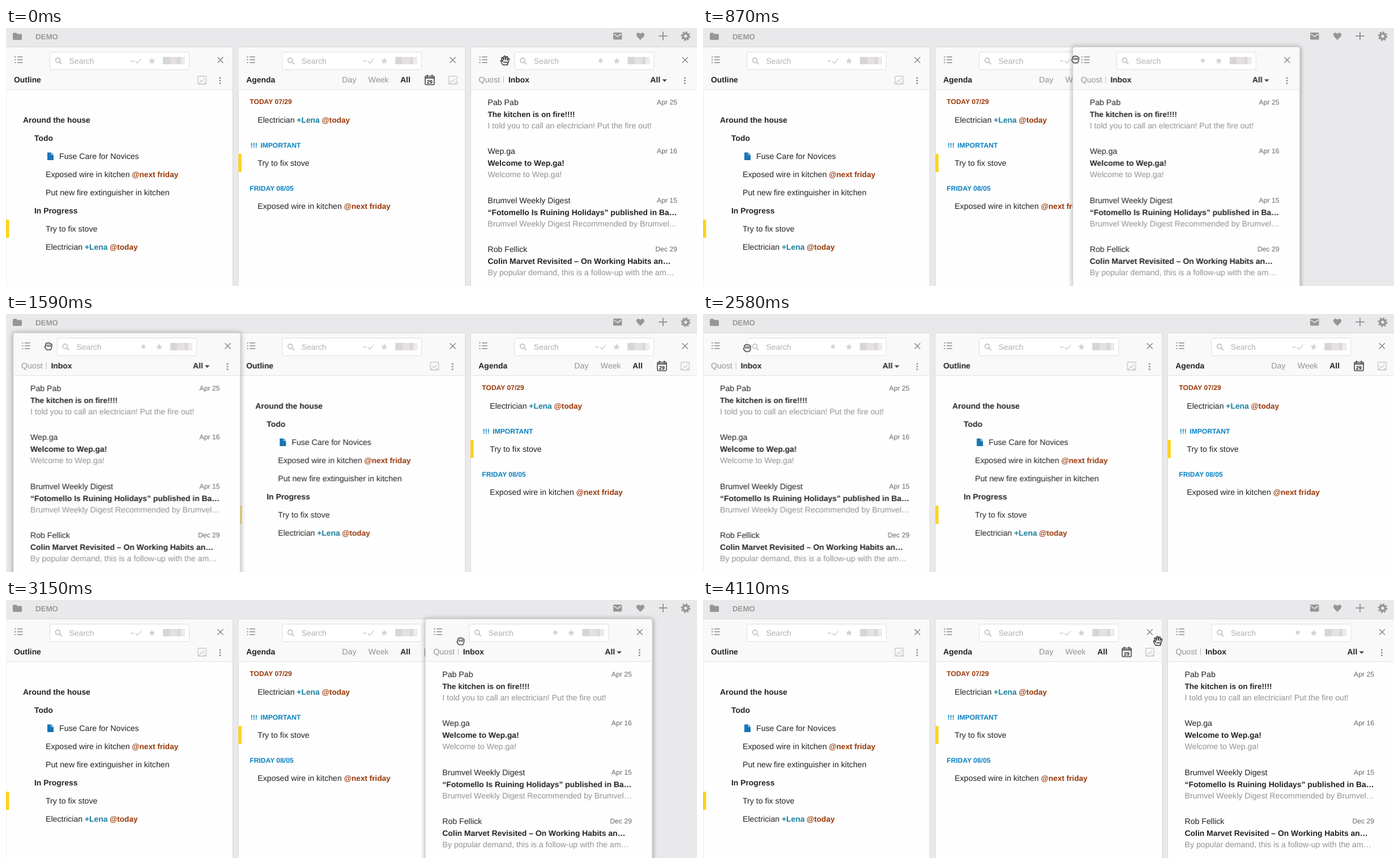
An HTML page that plays this animation: 1220 by 455 pixels, repeating every 4.2 s.

```html
<!DOCTYPE html>
<html lang="en">
<head>
<meta charset="utf-8">
<title>Panel dragging demo</title>
<style>
html, body { margin: 0; width: 100%; height: 100%; overflow: hidden; background: #e9e9eb; }
svg { display: block; width: 1220px; height: 455px; }
text { font: 14.15px "Liberation Sans", Arial, sans-serif; fill: #222; text-rendering: geometricPrecision; white-space: pre; }
.b { font-weight: bold; font-size: 13.9px; }
.tag { font-weight: bold; font-size: 13.6px; }
.g { fill: #929292; }
.small { font-size: 12.2px; fill: #666; text-anchor: end; }
.cap { font-weight: bold; font-size: 12.1px; }
.brown { fill: #983807; }
.blue { fill: #0881c1; }
.teal { fill: #1b7f9e; }
.line { fill: none; stroke: #888; stroke-width: 1.5; }
.pale { fill: none; stroke: #d4d4d4; stroke-width: 1.8; }

/* One loop is 4200 ms, so 1% is 42 ms. */
#outline, #agenda, #inbox, #shadow, #cx, #cy, #open, #fist { animation: 4.2s linear infinite; }
#outline { animation-name: outline; }
#agenda { animation-name: agenda; }
#inbox { animation-name: inbox; }
#shadow { animation-name: shadow; filter: blur(4px); }
#cx { animation-name: cx; }
#cy { animation-name: cy; }
#open { animation-name: open; animation-timing-function: step-end; }
#fist { animation-name: fist; animation-timing-function: step-end; }

@keyframes outline {
  0%, 26.5% { transform: translateX(0); animation-timing-function: ease; }
  31.26%, 65.9% { transform: translateX(410.3px); animation-timing-function: ease; }
  70.66%, 100% { transform: translateX(0); }
}
@keyframes agenda {
  0%, 21.31% { transform: translateX(410.3px); animation-timing-function: ease; }
  26.07%, 70.26% { transform: translateX(820.3px); animation-timing-function: ease; }
  75.02%, 100% { transform: translateX(410.3px); }
}
@keyframes inbox {
  0%, 15.12% { transform: translateX(820.5px); animation-timing-function: cubic-bezier(.45, 0, .55, 1); }
  32.5%, 39.52% { transform: translateX(13px); animation-timing-function: ease; }
  44.29%, 61.9% { transform: translateX(0); animation-timing-function: cubic-bezier(.45, 0, .55, 1); }
  75.52%, 82.38% { transform: translateX(742px); animation-timing-function: ease; }
  88.33%, 100% { transform: translateX(820.5px); }
}
@keyframes shadow {
  0%, 14.3% { opacity: 0; }
  15.5%, 39.52% { opacity: .33; }
  44.29%, 61.7% { opacity: 0; }
  62.9%, 82.38% { opacity: .33; }
  88.33%, 100% { opacity: 0; }
}
@keyframes cx {
  0%, 14.29% { transform: translateX(881px); animation-timing-function: cubic-bezier(.45, 0, .55, 1); }
  31.67%, 39.3% { transform: translateX(75px); }
  50%, 61.43% { transform: translateX(78px); animation-timing-function: cubic-bezier(.45, 0, .55, 1); }
  75.24%, 100% { transform: translateX(803px); }
}
@keyframes cy {
  0%, 14.29% { transform: translateY(57px); }
  20.71% { transform: translateY(55px); }
  31.67%, 39.3% { transform: translateY(56.5px); }
  50%, 61.43% { transform: translateY(59.5px); }
  69.29% { transform: translateY(79px); }
  75.24%, 100% { transform: translateY(72px); }
}
@keyframes open {
  0% { opacity: 1; }
  12.5% { opacity: 0; }
  39.4% { opacity: 1; }
  59.5% { opacity: 0; }
  82.38%, 100% { opacity: 1; }
}
@keyframes fist {
  0% { opacity: 0; }
  12.5% { opacity: 1; }
  39.4% { opacity: 0; }
  59.5% { opacity: 1; }
  82.38%, 100% { opacity: 0; }
}
</style>
</head>
<body>
<svg viewBox="0 0 1220 455">
  <defs>
    <g id="panel">
      <path d="M0 470V37Q0 33.5 4 33.5H397Q400.5 33.5 400.5 37V470Z" fill="#fefefe" stroke="#d9d9db"/>
      <path d="M.5 108V37Q.5 34 4 34H397Q400 34 400 37V108Z" fill="#f9f9f9"/>
      <path d="M.5 108.5H400" stroke="#e3e3e3"/>
      <path d="M15 51h2.5m2.5 0h9.5M15 56h2.5m2.5 0h9.5M15 61h2.5m2.5 0h9.5" class="line"/>
      <rect x="77.5" y="42.5" width="246" height="31" rx="3" fill="#fff" stroke="#dedede"/>
      <g class="pale" style="stroke: #c4c4c4">
        <circle cx="91.5" cy="57" r="4"/>
        <path d="M94.5 60l4 4"/>
      </g>
      <text x="111.5" y="63" style="fill: #b0b0b0; font-size: 13.9px">Search</text>
      <path d="M257.7 52l1.6 4 4.2 .3-3.2 2.7 1 4.2-3.6-2.3-3.6 2.3 1-4.2-3.2-2.7 4.2-.3z" fill="#d2d2d2"/>
      <path d="M277 51h13v13h-13z" fill="#d6d6d6"/>
      <path d="M290 51h12v13h-12z" fill="#e6e0e4"/>
      <path d="M302 51h7v13h-7z" fill="#d9d8da"/>
      <path d="M309 51h7v13h-7z" fill="#ebebeb"/>
      <path d="M373.5 51.5l10 10m0-10l-10 10" class="line"/>
    </g>
    <path id="dash" d="M220 58.5h6m2.5 0l3.5 3.5 7-7.5" class="pale"/>
    <g id="box" class="pale">
      <rect x="-7" y="-7" width="14.5" height="14" rx="1"/>
      <path d="M-3.5 0l3 3 5-6M-7 5h4m6 0h4"/>
    </g>
    <g id="dots" fill="#8c8c8c">
      <circle cx="378" cy="88" r="1.5"/><circle cx="378" cy="92.7" r="1.5"/><circle cx="378" cy="97.4" r="1.5"/>
    </g>
  </defs>

  <rect width="1220" height="455" fill="#e9e9eb"/>
  <g fill="#969696">
    <path d="M12 10q0-1.5 1.5-1.5h4.5l2 2h6.5q1.5 0 1.5 1.5v7.5q0 1.5-1.5 1.5h-13q-1.5 0-1.5-1.5z"/>
    <text x="52" y="20" class="b" style="fill: #999; font-size: 13.3px">DEMO</text>
    <rect x="1072" y="8" width="15.5" height="12.5" rx="1.5"/>
    <path d="M1073 10.5l6.7 4.5 6.8-4.5" fill="none" stroke="#e9e9eb" stroke-width="1.5"/>
    <path d="M1120 21l-5.5-5.5q-3-3.5-.5-6.2 3-2.3 6 1 3-3.3 6-1 2.5 2.7-.5 6.2z"/>
    <path d="M1152.5 14h15M1160 6.5v15" stroke="#969696" stroke-width="2"/>
    <g fill="none" stroke="#969696">
      <circle cx="1200" cy="14.5" r="4.6" stroke-width="3.8"/>
      <circle cx="1200" cy="14.5" r="7" stroke-width="3" stroke-dasharray="2.75"/>
    </g>
  </g>

  <g id="outline">
    <use href="#panel"/><use href="#dash"/><use href="#dots"/>
    <use href="#box" x="346" y="92"/>
    <text x="14" y="96" class="b">Outline</text>
    <text x="30" y="167" class="b">Around the house</text>
    <text x="50" y="199" class="b">Todo</text>
    <path d="M73 219.5h7l4 4v9.5h-11z" fill="#1a74b4"/>
    <path d="M80 219.5v4h4" fill="none" stroke="#fff" stroke-width=".8"/>
    <text x="94" y="231">Fuse Care for Novices</text>
    <text x="70" y="263">Exposed wire in kitchen <tspan x="222.3" class="tag brown">@next friday</tspan></text>
    <text x="70" y="295">Put new fire extinguisher in kitchen</text>
    <text x="50" y="327" class="b">In Progress</text>
    <path d="M0 338h5.5v32h-5.5z" fill="#ffd21c"/>
    <text x="70" y="359">Try to fix stove</text>
    <text x="70" y="391">Electrician <tspan x="139" class="b teal">+Lena</tspan> <tspan x="183" class="tag brown">@today</tspan></text>
  </g>

  <g id="agenda">
    <use href="#panel"/><use href="#dash"/>
    <use href="#box" x="378.5" y="92"/>
    <text x="14" y="96" class="b">Agenda</text>
    <text x="183" y="96" class="g">Day</text>
    <text x="229.5" y="96" class="g">Week</text>
    <text x="286" y="96" class="b">All</text>
    <g fill="none" stroke="#444" stroke-width="1.6">
      <rect x="329.8" y="85" width="16" height="15" rx="1.5"/>
      <path d="M330 88h16M333.5 82.5v4m8.5-4v4" stroke-width="2"/>
    </g>
    <text x="337.8" y="97.5" class="b" text-anchor="middle" style="font-size: 9px">29</text>
    <text x="20" y="134" class="cap brown">TODAY 07/29</text>
    <text x="34" y="167">Electrician <tspan x="103" class="b teal">+Lena</tspan> <tspan x="147.3" class="tag brown">@today</tspan></text>
    <text x="21.5" y="211" class="cap blue">!!!<tspan x="39">IMPORTANT</tspan></text>
    <path d="M0 222h5.5v32h-5.5z" fill="#ffd21c"/>
    <text x="34" y="243">Try to fix stove</text>
    <text x="20" y="287" class="cap blue">FRIDAY 08/05</text>
    <text x="34" y="319">Exposed wire in kitchen <tspan x="186.5" class="tag brown">@next friday</tspan></text>
  </g>

  <g id="inbox">
    <rect id="shadow" x="-1" y="33" width="403" height="440" rx="3"/>
    <use href="#panel"/><use href="#dots"/>
    <circle cx="229.5" cy="57.5" r="3.5" fill="#d6d6d6"/>
    <text x="14" y="96" class="g">Quost</text>
    <path d="M58 85v12" stroke="#bbb"/>
    <text x="66.5" y="96" class="b">Inbox</text>
    <text x="317" y="96" class="b">All</text>
    <path d="M338 90.5h8.5l-4.25 4.5z" fill="#444"/>
    <g>
      <text x="30" y="136">Pab Pab</text><text x="364.5" y="135" class="small">Apr 25</text>
      <text x="30" y="157" class="tag">The kitchen is on fire!!!!</text>
      <text x="30" y="177" class="g">I told you to call an electrician! Put the fire out!</text>
    </g>
    <g transform="translate(0 86.4)">
      <text x="30" y="136">Wep.ga</text><text x="364.5" y="135" class="small">Apr 16</text>
      <text x="30" y="157" class="b">Welcome to Wep.ga!</text>
      <text x="30" y="177" class="g">Welcome to Wep.ga!</text>
    </g>
    <g transform="translate(0 172.7)">
      <text x="30" y="136">Brumvel Weekly Digest</text><text x="364.5" y="135" class="small">Apr 15</text>
      <text x="30" y="157" class="b">“Fotomello Is Ruining Holidays” published in Ba…</text>
      <text x="30" y="177" class="g">Brumvel Weekly Digest Recommended by Brumvel…</text>
    </g>
    <g transform="translate(0 259)">
      <text x="30" y="136">Rob Fellick</text><text x="364.5" y="135" class="small">Dec 29</text>
      <text x="30" y="157" class="b">Colin Marvet Revisited – On Working Habits an…</text>
      <text x="30" y="177" class="g">By popular demand, this is a follow-up with the am…</text>
    </g>
  </g>

  <g id="cx"><g id="cy" fill="#fff" stroke="#333" stroke-width="1.5" stroke-linejoin="round">
    <path id="open" d="M-4 8L-7.5 1.5Q-8-.5-6 0L-4 2.5-6-4Q-5.5-6-3.8-5L-2.2-.5-2-7Q-.7-8.7 .4-7L.8-.8 2.3-6.4Q4-7.6 4.6-5.8L3.9 0 5.6-3.4Q7.5-4 7.5-2L5.5 4 4.5 8ZM-1.5 2v3M1 2v3M3.5 2v3"/>
    <path id="fist" d="M-3 6.5L-6 3Q-7 .5-5 0V-3Q-4.5-5.3-2.3-4.8-.7-6.5 1-5 2.8-5.8 3.8-4 6-4 6 -1.5 6 3 4 6.5ZM-2.3-2.5v4M.5-2.5v4M3.2-2.5v4"/>
  </g></g>
</svg>
</body>
</html>
```
